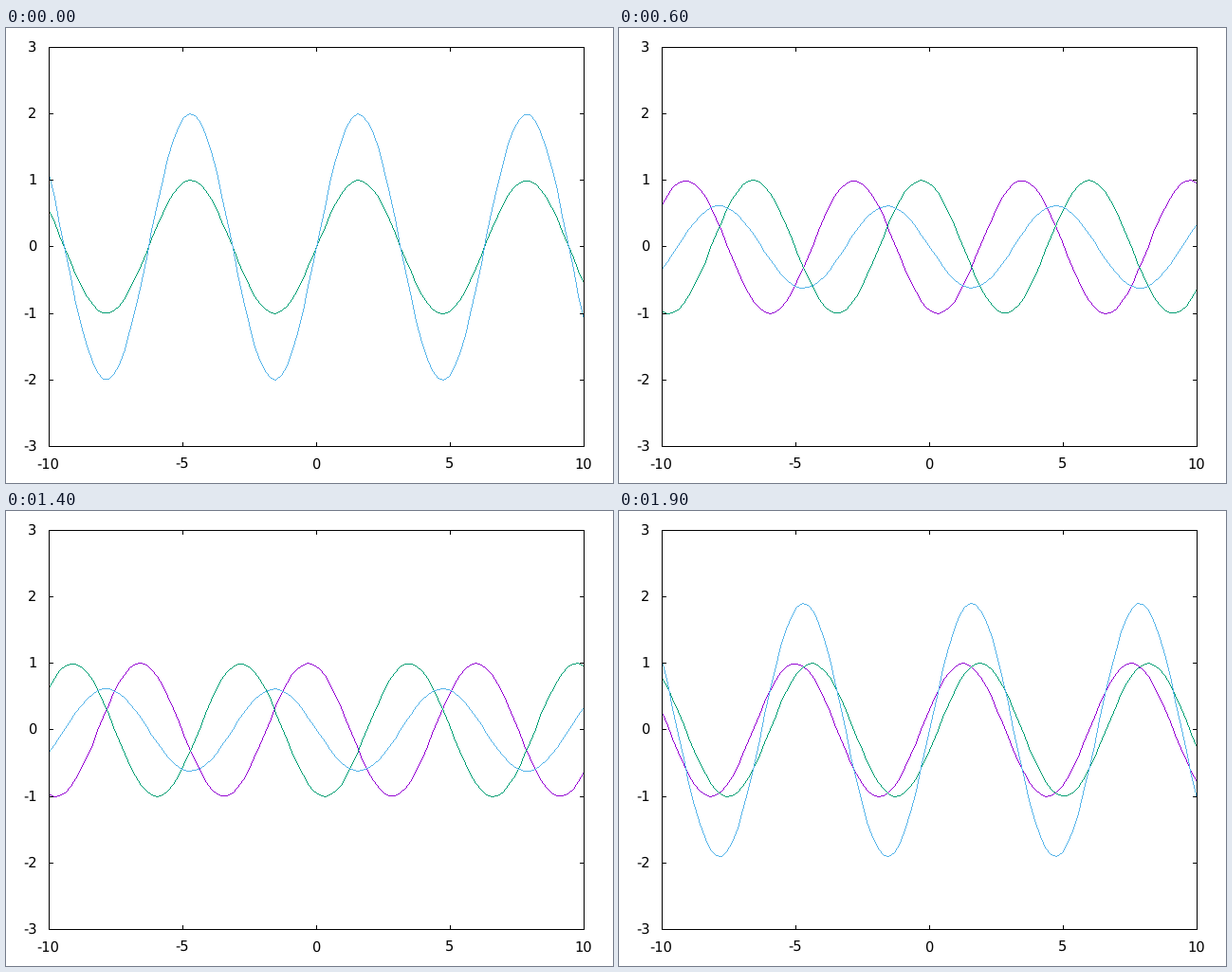
Recreate the animation shown at these times as a matplotlib script. Size 640 by 480 pixels, loop 2000 ms.

```python
import numpy as np
import matplotlib.pyplot as plt
from matplotlib.animation import FuncAnimation

plt.rcParams["font.family"] = "DejaVu Sans"
plt.rcParams["text.hinting"] = "none"

W, H, DPI = 640, 480, 80
LEFT, RIGHT, TOP, BOTTOM = 45, 609, 20, 441
FRAMES, INTERVAL = 20, 100
TICK = 4
FONT_PX = 14.67
BLACK = (0, 0, 0)
VIOLET, GREEN, BLUE = (148, 0, 211), (0, 158, 115), (86, 180, 233)

fig = plt.figure(figsize=(W / DPI, H / DPI), dpi=DPI, facecolor="white")
ax = fig.add_axes([0, 0, 1, 1])
ax.axis("off")


def to_px(x):
    return LEFT + np.floor((np.asarray(x) + 10) / 20 * (RIGHT - LEFT) + 0.5).astype(int)


def to_py(y):
    return BOTTOM - np.floor((np.asarray(y) + 3) / 6 * (BOTTOM - TOP) + 0.5).astype(int)


def segment(img, x0, y0, x1, y1, color):
    """One-pixel line without smoothing, stepped along its longer side."""
    steep = abs(y1 - y0) > abs(x1 - x0)
    a0, b0, a1, b1 = (y0, x0, y1, x1) if steep else (x0, y0, x1, y1)
    if a0 > a1:
        a0, b0, a1, b1 = a1, b1, a0, b0
    n = a1 - a0
    i = np.arange(n + 1)
    a = a0 + i
    b = b0 + np.sign(b1 - b0) * ((2 * i * abs(b1 - b0) + n) // max(2 * n, 1))
    rows, cols = (a, b) if steep else (b, a)
    img[rows, cols] = color


def polyline(img, xs, ys, color):
    for x0, y0, x1, y1 in zip(xs[:-1], ys[:-1], xs[1:], ys[1:]):
        segment(img, x0, y0, x1, y1, color)


def label(x, baseline, value, align):
    ax.text(x, baseline, str(value), ha=align, va="baseline",
            fontsize=FONT_PX * 72 / DPI, color="black")


def draw_frame(img):
    polyline(img, [LEFT, RIGHT, RIGHT, LEFT, LEFT],
             [BOTTOM, BOTTOM, TOP, TOP, BOTTOM], BLACK)
    for x in to_px(range(-10, 11, 5)):
        segment(img, x, BOTTOM, x, BOTTOM - TICK, BLACK)
        segment(img, x, TOP, x, TOP + TICK, BLACK)
    for y in to_py(range(-3, 4)):
        segment(img, LEFT, y, LEFT + TICK, y, BLACK)
        segment(img, RIGHT, y, RIGHT - TICK, y, BLACK)


blank = np.full((H, W, 3), 255, np.uint8)
canvas = ax.imshow(blank, extent=(0, W, H, 0), aspect="auto",
                   interpolation="nearest")

for v in range(-10, 11, 5):
    label(to_px(v) - 0.5, 465, v, "center")
for v in range(-3, 4):
    label(32.5, to_py(v) + 5, v, "right")

xs = np.linspace(-10, 10, 100)
px = to_px(xs)


def update(k):
    # Two travelling waves and their sum
    t = 2 * np.pi * k / FRAMES
    forward, backward = np.sin(xs - t), np.sin(xs + t)
    img = blank.copy()
    polyline(img, px, to_py(forward), VIOLET)
    polyline(img, px, to_py(backward), GREEN)
    polyline(img, px, to_py(forward + backward), BLUE)
    draw_frame(img)
    canvas.set_data(img)
    return [canvas]


anim = FuncAnimation(fig, update, frames=FRAMES, interval=INTERVAL,
                     repeat=True, repeat_delay=0)
plt.show()
```
